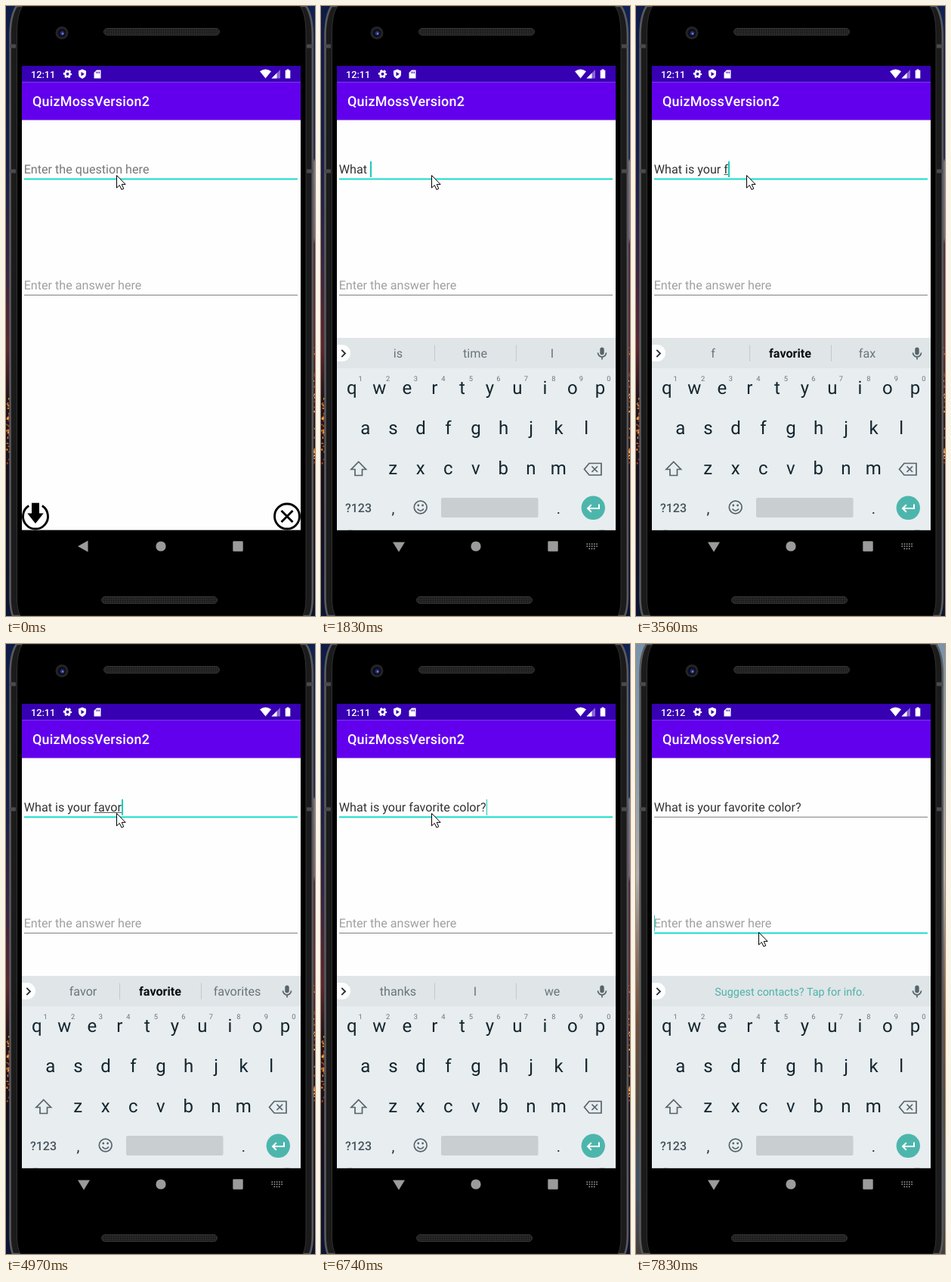
An HTML page that plays this animation: 409 by 805 pixels, repeating every 8 s.

```html
<!DOCTYPE html>
<html lang="en">
<head>
<meta charset="utf-8">
<title>Card editor</title>
<style>
  html, body { margin: 0; width: 100%; height: 100%; overflow: hidden; background: #000; }
  #stage { position: absolute; left: 0; top: 0; width: 409px; height: 805px; overflow: hidden; text-rendering: geometricPrecision; }
  svg { position: absolute; left: 0; top: 0; }
  svg, .field { font-family: Roboto, sans-serif; }
  .field { position: absolute; left: 23.7px; width: 362px; font-size: 16.15px; line-height: 20px; white-space: pre; color: #333; }
  .field u { text-underline-offset: 1px; text-decoration: underline 1px #555; text-decoration-skip-ink: none; }
  #question { top: 205.5px; }
  #answer { top: 358.7px; }
  .caret { position: absolute; top: -1px; width: 1.8px; height: 21.5px; background: #17cdbb; }
  .letters { font-size: 24px; fill: #14262e; text-anchor: middle; }
  .digits { font-size: 9.3px; fill: #6d7679; text-anchor: middle; }
  .words { font-size: 16.15px; fill: #68757b; text-anchor: middle; }
  .words .pick { font-weight: 700; fill: #0b0f11; }
  .icon { fill: none; stroke: #56646b; stroke-width: 1.7; }
</style>
</head>
<body>
<div id="stage">
<svg width="409" height="805" viewBox="0 0 409 805">
  <defs>
    <linearGradient id="night" x2="0" y2="1">
      <stop offset="0" stop-color="#0d1b46"/><stop offset=".25" stop-color="#141f4a"/>
      <stop offset=".42" stop-color="#352444"/><stop offset=".56" stop-color="#5c2630"/>
      <stop offset=".64" stop-color="#24141a"/><stop offset=".78" stop-color="#130f1c"/>
      <stop offset="1" stop-color="#0b1434"/>
    </linearGradient>
    <linearGradient id="nightRight" x2="0" y2="1">
      <stop offset="0" stop-color="#0f2152"/><stop offset=".25" stop-color="#1b2a58"/>
      <stop offset=".255" stop-color="#77738a"/><stop offset=".38" stop-color="#76667a"/>
      <stop offset=".39" stop-color="#4b2c46"/><stop offset=".55" stop-color="#5c2a34"/>
      <stop offset=".7" stop-color="#23141c"/><stop offset="1" stop-color="#0b1230"/>
    </linearGradient>
    <linearGradient id="day" x2="0" y2="1">
      <stop offset="0" stop-color="#7893ab"/><stop offset=".2" stop-color="#8b9dad"/>
      <stop offset=".38" stop-color="#b3b0ac"/><stop offset=".5" stop-color="#8e7869"/>
      <stop offset=".62" stop-color="#6d4e3b"/><stop offset=".76" stop-color="#50483f"/>
      <stop offset=".88" stop-color="#3d536b"/><stop offset="1" stop-color="#463d3a"/>
    </linearGradient>
    <pattern id="mesh" width="3" height="3" patternUnits="userSpaceOnUse">
      <rect width="3" height="3" fill="#292929"/><circle cx="1.5" cy="1.5" r=".9" fill="#151515"/>
    </pattern>
    <clipPath id="screen"><rect x="21" y="79" width="369" height="612.600"/></clipPath>
  </defs>

  <rect width="205" height="805" fill="url(#night)"/>
  <rect x="205" width="204" height="805" fill="url(#nightRight)"/>
  <g id="lights"></g>
  <rect id="daySky" width="409" height="805" fill="url(#day)" opacity="0"/>

  <path d="M14 0Q5.500 13 5.500 40V780Q5.500 796 9 805H402Q405.800 796 405.800 780V40Q405.800 13 397 0Z" fill="#1b1b1c" stroke="#59595b" stroke-width="2.600"/>
  <path d="M22 0Q14.500 10 14.500 36V782Q14.500 796 19 805H393Q397 796 397 782V36Q397 10 389 0Z" fill="#000" stroke="#303031"/>
  <path d="M5 53H13M5 218H13M398 53H406M398 218H406" stroke="#4a4a4c" stroke-width="5"/>

  <circle cx="74" cy="35.500" r="8.500" fill="#242426"/>
  <circle cx="74" cy="35.500" r="5.500" fill="#0c0e1c"/>
  <circle cx="74.500" cy="36" r="2.800" fill="#27347c"/>
  <circle cx="75" cy="36.500" r="1.100" fill="#8c9be0"/>
  <rect x="129.500" y="29.500" width="153" height="9" rx="4.500" fill="url(#mesh)" stroke="#343434"/>
  <rect x="126.500" y="779.500" width="153" height="9" rx="4.500" fill="url(#mesh)" stroke="#343434"/>

  <rect x="21" y="79" width="369" height="612.600" fill="#fefefe"/>
  <rect x="21" y="79" width="369" height="21.300" fill="#3700b3"/>
  <rect x="21" y="100.300" width="369" height="50.200" fill="#6200ee"/>
  <text id="clock" x="33" y="94.500" font-size="12.700" font-weight="500" fill="#fff">12:11</text>
  <g fill="none" stroke="#fff">
    <circle cx="81.500" cy="89.700" r="3.200" stroke-width="2.400"/>
    <circle cx="81.500" cy="89.700" r="4.800" stroke-width="1.800" stroke-dasharray="2.700 2.327" stroke-dashoffset="1.350"/>
  </g>
  <path d="M101 83.500L106 85.500V89.500Q106 94 101 96Q96 94 96 89.500V85.500Z" fill="#fff"/>
  <path d="M99.500 87V92.400L103.800 89.700Z" fill="#3700b3"/>
  <path d="M120 84.500H125.500V95.500H116.500V88Z" fill="#fff"/>
  <path d="M119.700 86.500V89M121.600 86.500V89M123.500 86.500V89" stroke="#3700b3" stroke-width=".9"/>
  <path d="M336 86.300Q343.500 80.700 351 86.300L343.500 95.500Z" fill="#fff"/>
  <path d="M363 84V95.500H351.500Z" fill="#fff" opacity=".4"/>
  <path d="M358.500 88.500V95.500H351.500Z" fill="#fff"/>
  <path d="M371.500 83.500H374.500V84.800H376.300V95.500H369.700V84.800H371.500Z" fill="#fff"/>
  <text x="35" y="132.300" font-size="17.950" font-weight="500" letter-spacing=".2" fill="#fff">QuizMossVersion2</text>

  <rect id="line1" x="24" width="362"/>
  <rect id="line2" x="24" width="362"/>

  <g stroke="#000" stroke-width="2.900" fill="none">
    <path d="M30.200 659.600A16.500 16.500 0 1 0 47.800 659.600"/>
    <path d="M34 655.800H44V669.500H49.700L39 683L28.300 669.500H34Z" fill="#000" stroke="none"/>
    <circle cx="372" cy="673.500" r="16.500"/>
    <path d="M364.500 666L379.500 681M379.500 666L364.500 681"/>
  </g>

  <g fill="#9b9b9b">
    <path id="back"/>
    <circle cx="205" cy="713" r="6.600"/>
    <rect x="300.300" y="706.300" width="13.400" height="13.400" rx="1.200"/>
    <path id="switcher" d="M351.500 710H366M351.500 713H366M354.500 716.300H363" fill="none" stroke="#a4a4a4" stroke-width="1.500" stroke-dasharray="1.600 1.600"/>
  </g>

  <g clip-path="url(#screen)"><g id="keyboard">
    <rect x="21" y="438" width="369" height="254" fill="#e8edf0"/>
    <rect x="21" y="438" width="369" height="40" fill="#e0e5e8"/>
    <path d="M21 447H28A11 11 0 0 1 28 469H21Z" fill="#fff"/>
    <path d="M27.300 453.800L32 458.500L27.300 463.200" fill="none" stroke="#263238" stroke-width="1.900"/>
    <rect x="369.300" y="450.500" width="5.400" height="10" rx="2.700" fill="#56646b"/>
    <path d="M366.500 457.500A5.500 5.500 0 0 0 377.500 457.500M372 463V466.500" class="icon"/>
    <text id="notice" x="203.700" y="464" font-size="14.350" fill="#4bb3a6" text-anchor="middle">Suggest contacts? Tap for info.</text>
    <g id="words" class="words">
      <path d="M150.500 447.500V469M258.500 447.500V469" stroke="#c2c8cb"/>
      <text x="102" y="464.300"></text><text x="204" y="464.300"></text><text x="306" y="464.300"></text>
    </g>
    <g id="letters" class="letters"></g>
    <g id="digits" class="digits"></g>
    <path class="icon" d="M49.800 601.500L59.500 611.500H54.500V619.500H45V611.500H40Z"/>
    <path class="icon" d="M355 603.500H371V619H355L348.500 611.300ZM358.500 607.500L366 615M366 607.500L358.500 615"/>
    <text x="49.500" y="667.700" font-size="16" font-weight="500" fill="#46545b" text-anchor="middle">?123</text>
    <g font-size="20" fill="#263238" text-anchor="middle"><text x="95.500" y="669.500">,</text><text x="314.500" y="669.500">.</text></g>
    <circle class="icon" cx="131.700" cy="661.500" r="8.400"/>
    <path class="icon" d="M127.500 663.500Q131.700 669 136 663.500"/>
    <circle cx="128.800" cy="659" r="1.400" fill="#56646b"/><circle cx="134.600" cy="659" r="1.400" fill="#56646b"/>
    <rect x="159" y="649" width="128.500" height="26" rx="2" fill="#c9ced1"/>
    <circle cx="360.300" cy="662.300" r="15.700" fill="#4db6ac"/>
    <path d="M368 657.500V663H353.500M357.800 658.300L353 663L357.800 667.700" fill="none" stroke="#fff" stroke-width="2"/>
  </g></g>
</svg>
<div class="field" id="question"></div>
<div class="field" id="answer"></div>
<svg width="409" height="805" viewBox="0 0 409 805">
  <path id="pointer" d="M0 0V16.500L3.800 13L6.500 18.800L9.300 17.500L6.700 11.900H11.600Z" fill="#fff" stroke="#000" stroke-linejoin="round"/>
</svg>
</div>
<script>
const LOOP = 8000;
const $ = id => document.getElementById(id);
const NS = 'http://www.w3.org/2000/svg';

function add(parent, tag, attrs, text) {
  const el = document.createElementNS(NS, tag);
  for (const k in attrs) el.setAttribute(k, attrs[k]);
  if (text) el.textContent = text;
  parent.append(el);
}

// Key rows: letters, centre of the first key, baseline
const PITCH = 36.53;
[['qwertyuiop', 40.7, 511.8], ['asdfghjkl', 58.9, 564.8], ['zxcvbnm', 95.2, 617.6]].forEach(([row, x, y], r) => {
  [...row].forEach((c, i) => {
    add($('letters'), 'text', { x: x + i * PITCH, y }, c);
    if (!r) add($('digits'), 'text', { x: x + i * PITCH + 11.5, y: 494.5 }, String((i + 1) % 10));
  });
});

// City lights on both sides of the phone
let seed = 7;
const rnd = () => (seed = seed * 16807 % 2147483647) / 2147483647;
for (let i = 0; i < 70; i++) {
  const left = i % 2;
  add($('lights'), 'rect', {
    x: left ? rnd() * 4 : 405 + rnd() * 3, y: (left ? 515 : 450) + rnd() * (left ? 90 : 155),
    width: 1 + rnd() * 2, height: 1 + rnd() * 2,
    fill: ['#e0702a', '#a8401c', '#f0a848'][i % 3]
  });
}

// Time, text (composing word after _), suggestions (* marks the pick)
const TYPING = [
  [0, '', ''],
  [1410, '_W', 'W|We|Why'],
  [1550, '_Wha', 'Wha|*What|Whats'],
  [1690, '_What', 'What|Whats|Whatever'],
  [1830, 'What ', 'is|time|I'],
  [2100, 'What _is', 'is|*is|I'],
  [2220, 'What is ', 'the|your|a'],
  [2590, 'What is _y', 'y|you|your'],
  [2740, 'What is _yo', 'yo|*you|your'],
  [3010, 'What is _you', 'you|your|yours'],
  [3160, 'What is _your', 'your|yours|yourself'],
  [3560, 'What is your _f', 'f|*favorite|fax'],
  [3990, 'What is your _fa', 'fa|*favorite|far'],
  [4140, 'What is your _fav', 'fav|*favorite|favor'],
  [4540, 'What is your _favo', 'favo|*favorite|favor'],
  [4970, 'What is your _favor', 'favor|*favorite|favorites'],
  [5120, 'What is your _favorit', 'favorit|*favorite|favorites'],
  [5270, 'What is your _favorite', 'favorite|favorites|favored'],
  [5550, 'What is your favorite ', 'color|thing|food'],
  [5690, 'What is your favorite _c', 'c|*color|car'],
  [5820, 'What is your favorite _co', 'co|*color|colors'],
  [5940, 'What is your favorite _col', 'col|*color|colors'],
  [6080, 'What is your favorite _colo', 'colo|*color|colors'],
  [6210, 'What is your favorite _color', 'color|colors|colored'],
  [6740, 'What is your favorite color?', 'thanks|I|we'],
  [7700, 'What is your favorite color?', '']
];
// Time, keyboard opacity, drop, hint grey
const OPENING = [[0, 0, 30, 120], [150, .3, 24, 130], [280, .75, 8, 145], [420, .95, 0, 157], [540, 1, 0, 160]];
const CARET = [[0, 0], [150, 1], [970, 0], [1410, 1], [7200, 0], [7700, 1]];
const POINTER = [[0, 146.5, 223.5], [7050, 154, 272], [7200, 162.5, 326.5], [7320, 163, 356], [7450, 162.5, 380.5]];
const DAWN = [[0, 0], [7050, .18], [7200, .36], [7320, .5], [7450, .65], [7580, .8], [7700, .9], [7830, 1]];

const at = (track, t) => track.findLast(step => step[0] <= t);
const hint = (text, g) => `<span style="color:rgb(${g},${g},${g})">${text}</span>`;
const BAR = '<i class="caret"></i>';

function setLine(id, y, active) {
  const h = active ? 1.8 : 1;
  $(id).setAttribute('y', y - h / 2);
  $(id).setAttribute('height', h);
  $(id).setAttribute('fill', active ? '#03dac5' : '#808080');
}

let shown = '';
function draw(t) {
  const [, text, list] = at(TYPING, t);
  const [, alpha, drop, grey] = at(OPENING, t);
  const caret = at(CARET, t)[1] ? BAR : '';
  const [, px, py] = at(POINTER, t);
  const dawn = at(DAWN, t)[1];
  const second = t >= 7700;
  const key = [text, list, alpha, caret, px, py, dawn, second].join();
  if (key === shown) return;
  shown = key;

  const [done, word] = text.split('_');
  const typed = done + (word ? `<u>${word}</u>` : '');
  const own = second ? '' : caret;
  $('question').innerHTML = text ? typed + own : own + hint('Enter the question here', grey);
  $('answer').innerHTML = (second ? caret : '') + hint('Enter the answer here', 160);
  setLine('line1', 228.4, !second);
  setLine('line2', 381.5, second);

  const options = list.split('|');
  $('words').style.display = list ? '' : 'none';
  $('notice').style.display = list ? 'none' : '';
  $('words').querySelectorAll('text').forEach((el, i) => {
    const s = options[i] || '';
    el.textContent = s.replace('*', '');
    el.setAttribute('class', s[0] === '*' ? 'pick' : '');
  });

  $('keyboard').setAttribute('opacity', alpha);
  $('keyboard').setAttribute('transform', `translate(0 ${drop})`);
  $('back').setAttribute('d', alpha ? 'M95 707.500H111L103 720.500Z' : 'M95 713L108.500 705.500V720.500Z');
  $('switcher').style.display = alpha ? '' : 'none';
  $('pointer').setAttribute('transform', `translate(${px} ${py})`);
  $('daySky').setAttribute('opacity', dawn);
  $('clock').textContent = t >= 7050 ? '12:12' : '12:11';
}

const start = performance.now();
function tick() {
  draw((performance.now() - start) % LOOP);
  requestAnimationFrame(tick);
}
tick();
</script>
</body>
</html>
```
